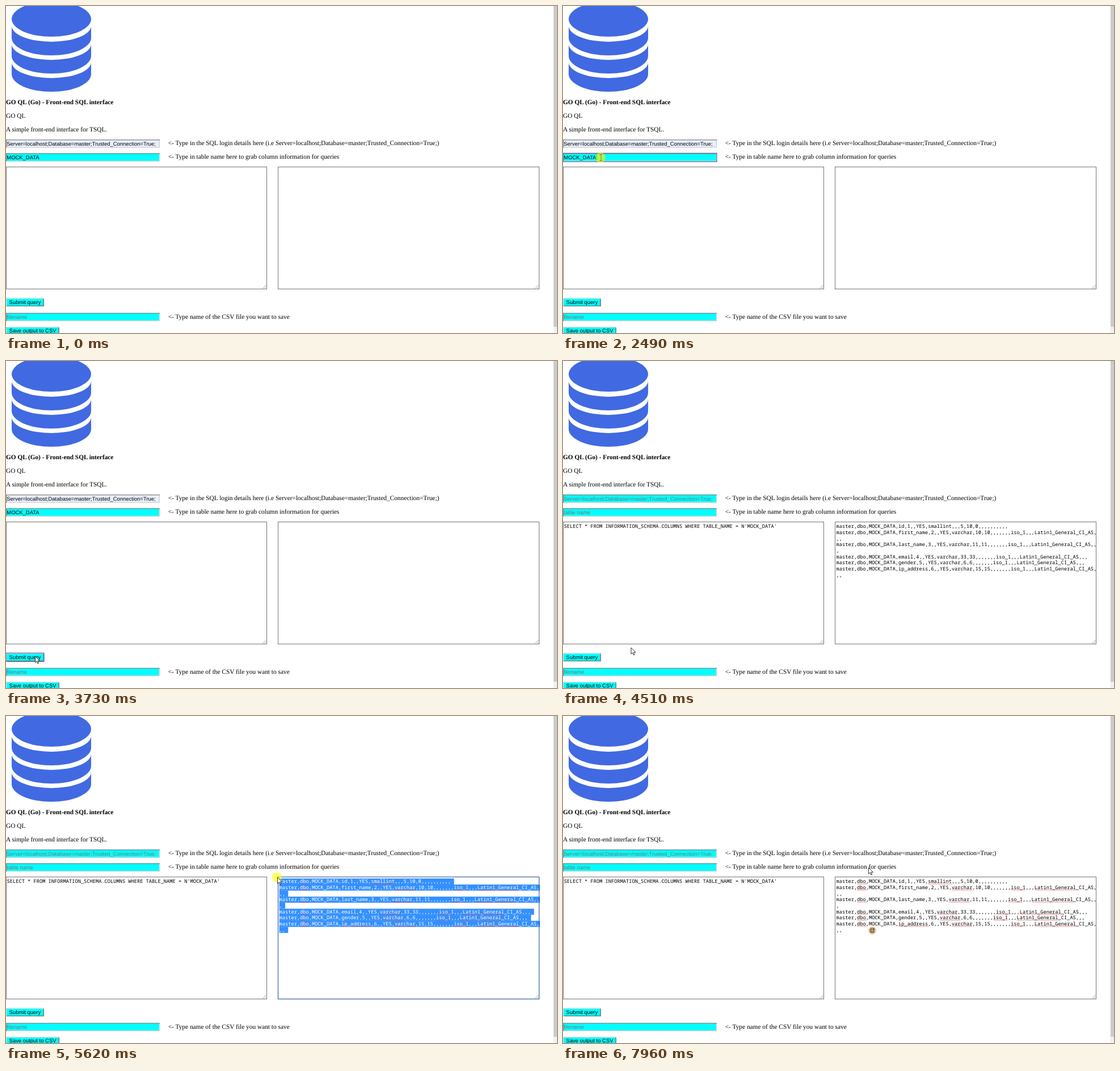
Animation of 971 by 576 pixels, one loop 8000 ms. Source, as an HTML page:

```html
<!DOCTYPE html>
<html lang="en">
<head>
<meta charset="utf-8">
<title>GO QL</title>
<style>
  html, body { margin: 0; width: 100%; height: 100%; overflow: hidden; background: #fff; }
  svg { display: block; width: 971px; height: 576px; }
  text { white-space: pre; text-rendering: geometricPrecision; }
  .serif { font: 11.36px "Liberation Serif", serif; }
  .bold { font-weight: bold; font-size: 11.3px; }
  .sans { font: 9.45px "Liberation Sans", sans-serif; }
  .mono { font: 8.7px "Noto Sans Mono", monospace; }
</style>
</head>
<body>
<svg id="stage" viewBox="0 0 971 576">
  <g id="page"></g>
  <g id="live"></g>
</svg>
<script>
const LOOP = 8000;
const CHAR = 5.22, LINE = 10.65, TOP = 286.2;
const CYAN = '#00ffff', GRAY = '#757575';
const page = document.getElementById('page');
const live = document.getElementById('live');

const esc = s => s.replace(/&/g, '&amp;').replace(/</g, '&lt;');
const text = (cls, x, y, s, fill = '#000') =>
  `<text class="${cls}" x="${x}" y="${y}" fill="${fill}">${esc(s)}</text>`;
const rect = (x, y, w, h, fill, extra = '') =>
  `<rect x="${x}" y="${y}" width="${w}" height="${h}" fill="${fill}" ${extra}/>`;
const line = (d, color, w = 1, extra = '') =>
  `<path d="${d}" fill="none" stroke="${color}" stroke-width="${w}" ${extra}/>`;

// Box with a two-tone bevel: a for top and left, b for bottom and right
const bevel = (x, y, w, h, fill, a, b) =>
  rect(x, y, w, h, fill) +
  line(`M${x + w - .7} ${y}V${y + h - .7}H${x}`, b, 1.4) +
  line(`M${x + .6} ${y + h}V${y + .7}H${x + w}`, a, 1.4);
const field = (y, s, fill, color) =>
  bevel(0, y, 271, 14.4, fill, '#858585', '#d0d0d0') + text('sans', 1.3, y + 10.7, s, color);
const button = (y, w, s) =>
  bevel(0, y, w, 14.5, CYAN, '#c8dede', '#767676') + text('sans', 5.6, y + 10.4, s);
const area = (x, w) =>
  rect(x, 283.5, w, 215, '#fff', 'stroke="#767676"') +
  line(`M${x + w - 7} 497.5l6-6M${x + w - 3.5} 497.5l2.5-2.5`, '#888', .8);

function drawPage() {
  const band = y => `M10 ${y}A70 28 0 0 0 150 ${y}V${y + 21}A70 31 0 0 1 10 ${y + 21}Z`;
  page.innerHTML =
    `<g fill="#4169e1"><ellipse cx="80" cy="23" rx="70" ry="31"/>` +
    `<path d="${[35, 67, 99].map(band).join('')}"/></g>` +
    text('serif bold', 0, 173, 'GO QL (Go) - Front-end SQL interface') +
    text('serif', 0, 197, 'GO QL') +
    text('serif', 0, 221, 'A simple front-end interface for TSQL.') +
    text('serif', 285.7, 245, '<- Type in the SQL login details here (i.e Server=localhost;Database=master;Trusted_Connection=True;)') +
    text('serif', 285.7, 269.4, '<- Type in table name here to grab column information for queries') +
    text('serif', 285.7, 550.8, '<- Type name of the CSV file you want to save') +
    area(.5, 459) + area(479.5, 460) +
    field(540.7, 'filename', CYAN, GRAY) +
    button(514.6, 67, 'Submit query') + button(565, 94, 'Save output to CSV') +
    rect(964.5, 0, 7, 576, '#f1f1f1') + rect(965, 0, 6, 565, '#cbcbcb');
}

// Query result, wrapped to the width of the text area
const COLS = 88;
const rows = [['id,1', 'smallint,,,5,10,0,,,,,,,,,,']].concat(
  [['first_name', 10], ['last_name', 11], ['email', 33], ['gender', 6], ['ip_address', 15]]
    .map(([name, n], i) => [`${name},${i + 2}`, `varchar,${n},${n},,,,,,,iso_1,,,Latin1_General_CI_AS,,,`]));
const output = [];
for (const [head, tail] of rows) {
  const s = `master,dbo,MOCK_DATA,${head},,YES,${tail}`;
  for (let i = 0; i < s.length; i += COLS)
    output.push({ s: s.slice(i, i + COLS), end: i + COLS >= s.length });
}

function squiggles(s, x, y) {
  let out = '';
  for (const m of s.matchAll(/dbo|smallint|varchar|iso_1|Latin1_General|ip_address/g)) {
    const n = Math.round(m[0].length * CHAR / 2.8);
    out += line(`M${x + m.index * CHAR} ${y}` + 'l1.4 -1.2l1.4 1.2'.repeat(n), '#f04848', .7);
  }
  return out;
}

// sel: [row, column] where the selection begins; it runs to the end
function results(sel, spell) {
  const x = 481.6;
  return output.map(({ s, end }, i) => {
    const y = TOP + i * LINE, base = y + 8.1;
    const from = !sel || i < sel[0] ? s.length : i === sel[0] ? sel[1] : 0;
    const picked = sel && i >= sel[0];
    const sx = x + from * CHAR;
    return (picked ? rect(sx, y, (s.length - from + (end ? 1 : 0)) * CHAR, LINE + .1, '#3390ff') : '') +
      text('mono', x, base, s.slice(0, from)) +
      (picked ? text('mono', sx, base, s.slice(from), '#fff') : '') +
      (spell ? squiggles(s, x, base + 2.2) : '');
  }).join('');
}

// time, x, y, shape (a arrow, i text beam), click highlight
const moves = [
  [0, 0, 0, ''],
  [440, 380, 178, 'a'], [600, 352, 196, 'a'], [750, 312, 218, 'a'], [910, 281, 236, 'a'],
  [1070, 268, 243, 'i'], [1220, 264, 244, 'i', 1], [1380, 264, 244, 'i'],
  [1530, 240, 247, 'i'], [1690, 170, 254, 'i'], [1850, 100, 261, 'i'], [2000, 72, 265, 'i'],
  [2320, 67, 267, 'i', 1], [2640, 75, 297, 'i'], [2800, 80, 330, 'i', 1],
  [2950, 78, 395, 'i'], [3110, 73, 475, 'i'], [3260, 68, 516, 'a'], [3430, 51.5, 520, 'a'],
  [4510, 120, 505, 'a'], [4670, 290, 450, 'i'], [4820, 470, 415, 'a'], [4980, 600, 398, 'i'],
  [5140, 672, 394, 'i'], [5300, 672, 394, 'i', 1], [5450, 575, 346, 'i', 1], [5620, 478.5, 284, 'a', 1],
  [5780, 490, 310, 'i'], [5930, 520, 368, 'i'], [6090, 533, 392, 'i', 1], [6240, 533, 392, 'i'],
  [6400, 546, 320, 'i'], [6560, 558, 262, 'a'], [7810, 549, 264, 'a'], [7960, 538.5, 267, 'a']
];
const focusAt = [[0, ''], [1220, 'login'], [2320, 'table'], [2800, 'query'], [3730, 'submit'],
  [3900, ''], [5140, 'result'], [6710, '']];
const caretAt = [[0, ''], [1220, 'login'], [2000, ''], [2320, 'table'], [2800, 'query'], [3430, ''],
  [5140, 'result'], [5450, ''], [6090, 'result'], [6400, '']];
const selectAt = [[0, null], [5450, [5, 18]], [5620, [0, 0]], [6090, null]];
const badgeAt = [[0, 0], [6240, .5], [6400, 1]];

const rings = {
  login: [0, 235.3, 271, 15], table: [0, 259.3, 271, 15], submit: [0, 514.4, 67, 15],
  query: [.5, 283.5, 459, 215], result: [479.5, 283.5, 460, 215]
};
const carets = { login: [264.5, 237.5], table: [59.6, 261.5], query: [2.5, 286], result: [482.5, 381.5] };

const at = (table, t) => table.findLast(r => r[0] <= t);

function cursor([, x, y, shape, click]) {
  let out = '';
  if (click) out += `<circle cx="${x - 1}" cy="${y}" r="8.8" fill="#ff0" opacity=".62"/>`;
  const pos = `transform="translate(${x} ${y})"`;
  if (shape === 'i') out += line('M-2.6 -5.5h5.2M0 -5.5v11M-2.6 5.5h5.2', y < 275 && x < 271 ? '#a8641c' : '#222', 1, pos);
  if (shape === 'a') out += `<path d="M0 0V11.2L2.6 8.8L4.4 13L6.2 12.2L4.4 8.2H8Z" fill="#fff" stroke="#000" stroke-width=".8" ${pos}/>`;
  return out;
}

const badge = opacity =>
  `<g opacity="${opacity}"><circle cx="545" cy="377.8" r="6.7" fill="#deb887"/>` +
  line('M545 375h-2.7v5.6h5.4v-2.6M544.6 378.2l3.4-3.4M545.8 374.7h2.3v2.3', '#222', 1) + '</g>';

function scene(t) {
  const done = t >= 3900;
  const focus = at(focusAt, t)[1], caret = at(caretAt, t)[1], glow = at(badgeAt, t)[1];
  const login = 'Server=localhost;Database=master;Trusted_Connection=True;';
  let out = done
    ? field(235.2, login, CYAN, GRAY) + field(259.4, 'table name', CYAN, GRAY) +
      text('mono', 1.6, 294.3, "SELECT * FROM INFORMATION_SCHEMA.COLUMNS WHERE TABLE_NAME = N'MOCK_DATA'") +
      results(at(selectAt, t)[1], t >= 5450)
    : field(235.2, login, '#e8f0fe', '#000') + field(259.4, 'MOCK_DATA', CYAN, '#000');
  if (focus) {
    const color = focus !== 'result' ? '#5c6f9e' : t < 5780 ? '#3a62a8' : '#3c8fe0';
    out += rect(...rings[focus], 'none', `stroke="${color}" stroke-width="1.2"`);
  }
  if (caret) out += line(`M${carets[caret].join(' ')}v10`, '#000', .9);
  if (glow) out += badge(glow);
  return out + cursor(at(moves, t));
}

const cuts = [...new Set([moves, focusAt, caretAt, selectAt, badgeAt, [[3900], [5780]]]
  .flat().map(r => r[0]))].sort((a, b) => a - b);
let shown = -1;
function tick() {
  const t = performance.now() % LOOP;
  const cut = cuts.findLast(c => c <= t);
  if (cut !== shown) {
    live.innerHTML = scene(cut);
    shown = cut;
  }
  requestAnimationFrame(tick);
}

drawPage();
tick();
</script>
</body>
</html>
```
